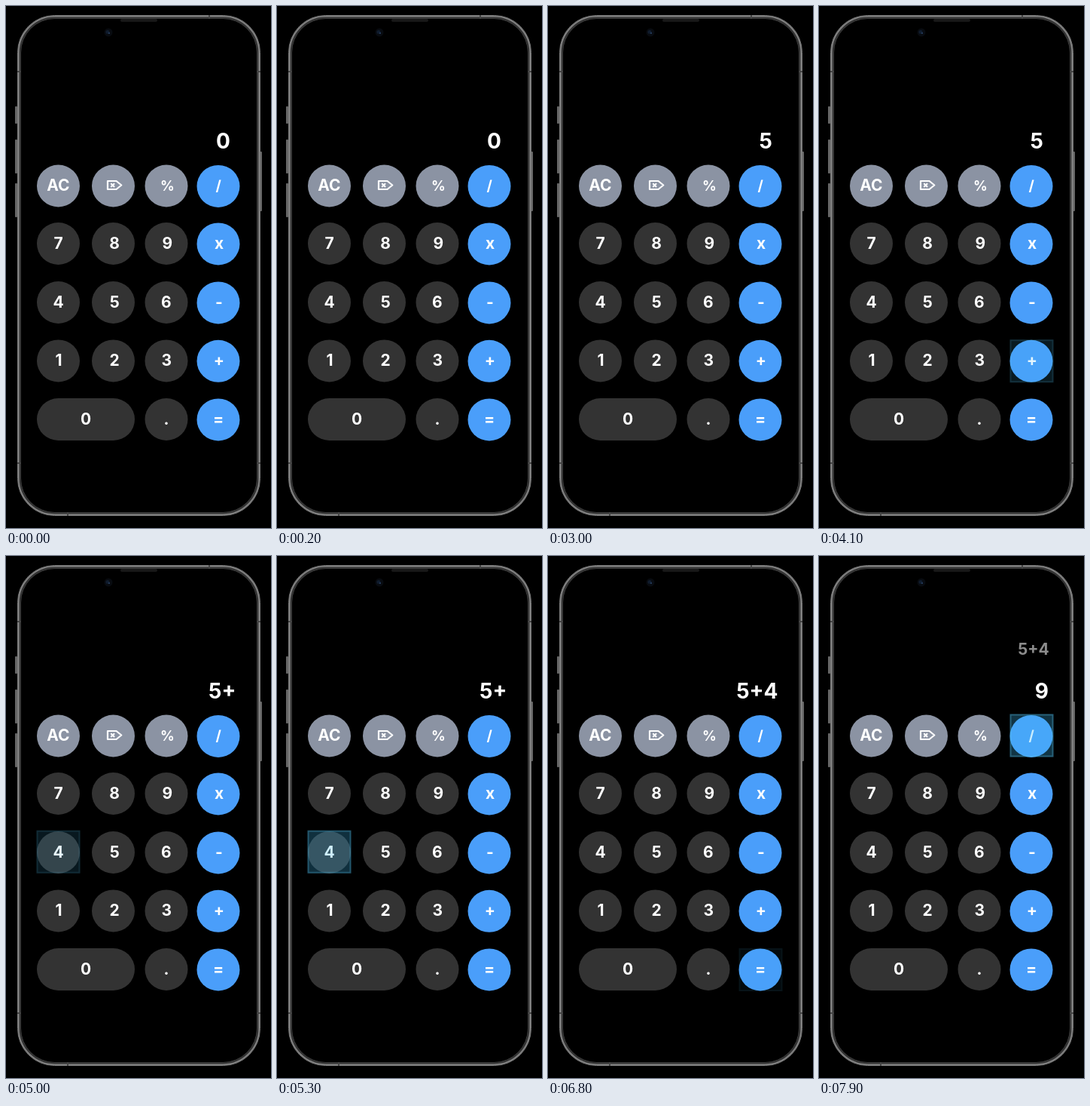
Animation, 352 px wide and 692 px high, one loop 8000 ms. Source, as an HTML page:

```html
<!DOCTYPE html>
<html lang="en">
<head>
<meta charset="utf-8">
<title>Calculator</title>
<style>
html, body { margin: 0; width: 100%; height: 100%; overflow: hidden; background: #000; }
svg { display: block; width: 352px; height: 692px; }
text { font: 700 21px Inter, "Liberation Sans", sans-serif; fill: #fff; text-anchor: middle; }
#main { font-size: 28px; text-anchor: end; }
#past { text-anchor: end; fill: #8c8c8c; }
</style>
</head>
<body>
<svg viewBox="0 0 352 692">
  <g fill="#666">
    <rect x="12" y="133" width="3" height="23" rx="1"/>
    <rect x="12" y="177" width="3" height="45" rx="1"/>
    <rect x="12" y="235" width="3" height="45" rx="1"/>
    <rect x="337" y="193" width="3" height="79" rx="1"/>
  </g>
  <rect x="15.5" y="12.5" width="322" height="663" rx="49" fill="#333" stroke="#777"/>
  <rect x="16.8" y="13.8" width="319.4" height="660.4" rx="48" fill="none" stroke="#858585" stroke-width="1.6"/>
  <rect x="19.5" y="16.5" width="314" height="655" rx="45.5" stroke="#3c3c3c"/>
  <path d="M15 87h5M333 87h5M15 606h5M333 606h5M82 671v5M270 12v5" stroke="#444" stroke-width="2"/>
  <rect x="152" y="17" width="49" height="4" rx="2" fill="#181818"/>
  <circle cx="136" cy="35" r="5.5" fill="#080b10"/>
  <circle cx="135" cy="34.5" r="2.5" fill="#101c2e"/>
  <circle cx="137" cy="36" r="1" fill="#2a4468"/>
  <g id="keys"></g>
  <g fill="none" stroke="#fff" stroke-width="2.2" stroke-linejoin="round">
    <path d="M135 232h11.5l6.8 5.5-6.8 5.5H135z"/>
    <path d="M139.3 235.2l4.8 4.8m0-4.8l-4.8 4.8" stroke-width="2"/>
  </g>
  <text id="past" x="305.8" y="131"></text>
  <text id="main" y="189"></text>
  <rect id="glow" width="56" height="55" fill="#40c0f8" fill-opacity=".5" stroke="#50c4f4" stroke-width="2" stroke-opacity=".85"/>
</svg>
<script>
const $ = id => document.getElementById(id);
const GREY = '#8b93a3', DARK = '#333', BLUE = '#4a9efa';
const columns = [69.5, 142.5, 213, 282];
const rows = [238.5, 315, 393, 470.4, 548];

// Each key: label, label x
const layout = [
  [['AC', 69.3], ['', 142.5], ['%', 214.5], ['/', 282.2]],
  [['7', 69.5], ['8', 144], ['9', 214.3], ['x', 283]],
  [['4', 69.5], ['5', 144.3], ['6', 212.8], ['-', 283]],
  [['1', 70], ['2', 144], ['3', 213.2], ['+', 283]],
  [['0', 106], null, ['.', 213], ['=', 282.2]]
];
const sizes = { '%': 18.5, '/': 19 };

$('keys').innerHTML = layout.map((row, r) => row.map((key, c) => {
  if (!key) return '';
  const [label, x] = key;
  const isOperator = c === 3;
  const width = label === '0' ? 130 : 57;
  const top = rows[r] - 28 + (isOperator ? 0.4 : 0);
  const fill = isOperator ? BLUE : r ? DARK : GREY;
  const size = sizes[label] || 21;
  return `<rect x="${columns[c] - 28.5}" y="${top}" width="${width}" height="56" rx="28.5" ry="28" fill="${fill}"/>
    <text x="${x}" y="${rows[r] + 6.8}" style="font-size:${size}px">${label}</text>`;
}).join('')).join('');

// Display states: start time, entry, right edge, previous entry
const states = [
  [0, '0', 298, ''],
  [3000, '5', 298, ''],
  [4500, '5+', 305.5, ''],
  [5700, '5+4', 305.5, ''],
  [7000, '9', 305, '5+4']
];

// Key flashes: peak time, column centre, row centre
const flashes = [
  [2300, 143.5, 393],
  [3775, 282.5, 470.7],
  [5075, 69.5, 392.2],
  [6400, 282.5, 548.5],
  [7700, 282.5, 238]
];

function strength(age) {
  return Math.max(0, age < 0 ? 1 + age / 100 : 1 - age / 450);
}

function draw(now) {
  const t = Math.floor(now % 8000 / 100) * 100;
  const [, entry, edge, past] = states.findLast(s => t >= s[0]);
  $('main').textContent = entry;
  $('main').setAttribute('x', edge);
  $('past').textContent = past;

  const flash = flashes.find(f => t > f[0] - 100 && t < f[0] + 450);
  $('glow').setAttribute('opacity', flash ? strength(t - flash[0]) : 0);
  if (flash) {
    $('glow').setAttribute('x', flash[1] - 28);
    $('glow').setAttribute('y', flash[2] - 27.5);
  }
}

const start = performance.now();
function tick() {
  draw(performance.now() - start);
  requestAnimationFrame(tick);
}
tick();
</script>
</body>
</html>
```
